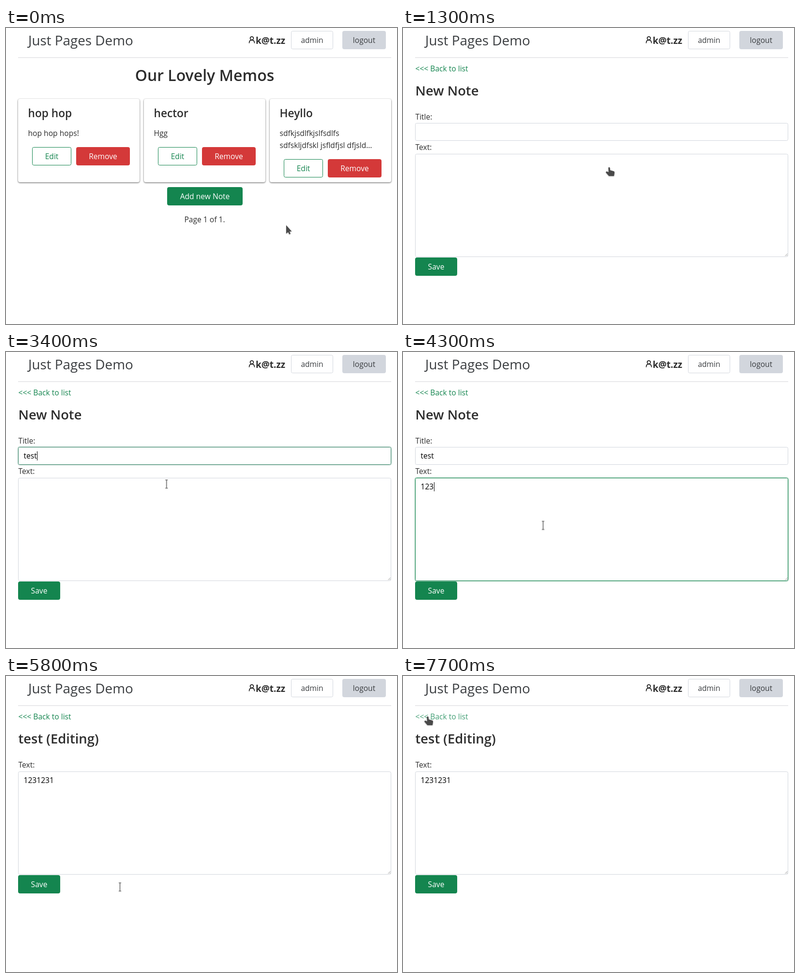
An HTML page for the animation above (8 s loop, 808 px wide and 614 px high).

```html
<!DOCTYPE html>
<html lang="en">
<head>
<meta charset="utf-8">
<title>Notes app</title>
<style>
  html, body { margin: 0; width: 100%; height: 100%; overflow: hidden; background: #fff; }
  svg { display: block; width: 808px; height: 614px; font: 15.6px "Open Sans", "Noto Sans", sans-serif; }
  .card { filter: drop-shadow(0 1px 1.5px rgba(0, 0, 0, .65)); }
  .cursor { filter: drop-shadow(0 1px 1px rgba(0, 0, 0, .3)); }
</style>
</head>
<body>
<svg id="stage" viewBox="0 0 808 614"></svg>
<script>
const LOOP = 8000, STEP = 100;
const GREEN = '#14854f', LIGHT_GREEN = '#439f75', RED = '#d43939';
const INK = '#2d2d2d', GREY = '#d2d6dd', HOVER = '#b9bdc4', DARK = '#706c76';
const stage = document.getElementById('stage');
const pen = document.createElement('canvas').getContext('2d');
pen.font = '15.6px "Open Sans", "Noto Sans", sans-serif';

// Pointer path: time, x, y, shape from that time on
const path = [
  [0, 579, 409, 'arrow'], [400, 484, 364, 'hand'], [700, 425, 346, 'hand'],
  [800, 425, 346, 'hand'], [1300, 426, 289, 'hand'], [1400, 415, 275, 'beam'],
  [1700, 390, 250, 'beam'], [2000, 363.5, 209.5, 'beam'], [3100, 363.5, 209.5, 'beam'],
  [3800, 289.5, 359.5, 'beam'], [4500, 289.5, 359.5, 'beam'], [4800, 100, 486, 'hand'],
  [4900, 80, 491, 'hand'], [5000, 80, 491, 'hand'], [5100, 160, 464, 'beam'],
  [5200, 235.5, 437.5, 'beam'], [6400, 235.5, 437.5, 'beam'], [6500, 339.5, 397.5, 'beam'],
  [7000, 110, 150, 'arrow'], [7200, 56, 92, 'hand'], [7300, 48, 84, 'hand'],
  [7600, 48, 84, 'hand'], [7700, 51, 84, 'hand'], [LOOP, 51, 84, 'hand']
];
const shapes = {
  arrow: '<path fill="#4a4a4a" d="M0 0V17.5L4 14.2L6.4 19L9 17.8L6.8 13H11.5Z"/>',
  hand: '<path fill="#4a4a4a" d="M-1.6 .8Q0 -1.2 1.5 .8L2.2 6L10 8.2Q11.4 9 11 12L10 18H-.5L-6.6 11Q-7 8.4 -4.8 8.6L-1.2 10Z"/>',
  beam: '<path fill="none" stroke="#444" d="M0 -8V8M-2.5 -8.5H2.5M-2.5 8.5H2.5"/>'
};

const within = (t, from, to) => t >= from && t < to;

function text(x, y, str, { size = 15.6, weight = 400, fill = INK, anchor = 'start' } = {}) {
  return `<text x="${x}" y="${y}" font-size="${size}" font-weight="${weight}" fill="${fill}" text-anchor="${anchor}">${str.replace(/</g, '&lt;')}</text>`;
}

function box(x, y, w, h, fill, stroke = fill, extra = '') {
  return `<rect x="${x + .5}" y="${y + .5}" width="${w - 1}" height="${h - 1}" rx="3" fill="${fill}" stroke="${stroke}" ${extra}/>`;
}

function button(x, y, w, label, fill, color = '#fff', stroke = fill) {
  return box(x, y, w, 38, fill, stroke) + text(x + w / 2, y + 25, label, { fill: color, anchor: 'middle' });
}

function header() {
  return text(46, 36, 'Just Pages Demo', { size: 27.8, fill: '#3a3d40' })
    + '<path fill="none" stroke="#000" stroke-width="1.5" d="M502.5 31.5Q502.5 25 508 25T513.5 31.5"/>'
    + '<circle cx="508" cy="21.3" r="3.4" fill="#fff" stroke="#000" stroke-width="1.5"/>'
    + text(516, 33, 'k@t.zz', { size: 19, weight: 700 })
    + button(589, 6, 87, 'admin', '#fff', '#3a3d40', GREY)
    + button(695, 6, 90, 'logout', GREY, '#3a3d40')
    + '<path stroke="#d6d6da" d="M25 61.5H796"/>';
}

function card(x, title, lines) {
  const y = 222 + 25 * lines.length;
  return box(x, 147, 251, 173, '#fff', '#fff', 'class="card"')
    + text(x + 20.5, 185, title, { size: 22.7, weight: 600 })
    + lines.map((line, i) => text(x + 20.5, 224 + 25 * i, line)).join('')
    + button(x + 29, y, 81, 'Edit', '#fff', GREEN, GREEN)
    + button(x + 120, y, 111, 'Remove', RED);
}

function listPage(t) {
  return text(410.5, 110, 'Our Lovely Memos', { size: 32, weight: 600, anchor: 'middle' })
    + card(25, 'hop hop', ['hop hop hops!'])
    + card(285, 'hector', ['Hgg'])
    + card(545, 'Heyllo', ['sdfkjsdlfkjslfsdlfs', 'sdfskljdfskl jsfldfjsl dfjsld…'])
    + button(333, 330, 156, 'Add new Note', t >= 400 ? LIGHT_GREEN : GREEN)
    + text(410.5, 403, 'Page 1 of 1.', { anchor: 'middle' });
}

function field(y, h, value, border, focused) {
  const glow = focused ? box(24, y - 1, 773, h + 2, 'none', border, 'opacity=".4"') : '';
  const grip = h > 40 ? `<path stroke="#999" d="M789.5 ${y + h - 2}l5 -5M792.5 ${y + h - 2}l2 -2"/>` : '';
  const x = value ? Math.round(37 + pen.measureText(value).width) + .5 : 36.5;
  const caret = focused ? `<path stroke="#000" d="M${x} ${y + 9}v19"/>` : '';
  return glow + box(25, y, 771, h, '#fff', border) + grip
    + text(36.5, y + 24, value, { fill: '#000' }) + caret;
}

function formTop(t, heading) {
  return text(25.5, 90, '<<< Back to list', { fill: t >= 7200 ? LIGHT_GREEN : GREEN })
    + text(25.5, 140, heading, { size: 27.4, weight: 600 });
}

function newPage(t) {
  const inTitle = within(t, 2200, 3500), inText = within(t, 3600, 5000);
  const title = 'test'.slice(0, t < 2900 ? 0 : t < 3000 ? 2 : 4);
  const note = '1231231'.slice(0, Math.max(0, (t - 4000) / STEP));
  const titleBorder = inTitle ? '#428a70' : within(t, 1900, 2200) ? HOVER : GREY;
  const hovered = within(t, 1400, 1900) || t >= 5100;
  return formTop(t, 'New Note')
    + text(25.5, 190, 'Title:') + field(197, 37, title, titleBorder, inTitle)
    + text(25.5, 253, 'Text:') + field(261, 214, note, inText ? GREEN : hovered ? HOVER : GREY, inText)
    + button(25, 476, 87, 'Save', within(t, 4800, 5400) ? LIGHT_GREEN : GREEN);
}

function editPage(t) {
  const border = within(t, 6100, 6600) ? DARK : within(t, 6600, 7000) ? HOVER : GREY;
  return formTop(t, 'test (Editing)')
    + text(25.5, 190, 'Text:') + field(198, 214, '1231231', border, false)
    + button(25, 413, 87, 'Save', GREEN);
}

function cursor(t) {
  const i = path.findIndex(key => key[0] > t);
  const [t0, x0, y0, shape] = path[i - 1], [t1, x1, y1] = path[i];
  const k = (t - t0) / (t1 - t0);
  return `<g class="cursor" transform="translate(${x0 + (x1 - x0) * k} ${y0 + (y1 - y0) * k})">${shapes[shape]}</g>`;
}

let shown = -1;
function draw(now) {
  const t = Math.floor(now % LOOP / STEP) * STEP;
  if (t !== shown) {
    shown = t;
    const page = t < 1100 ? listPage : t < 5800 ? newPage : editPage;
    stage.innerHTML = header() + page(t) + cursor(t);
  }
  requestAnimationFrame(() => draw(performance.now() - start));
}
const start = performance.now();
draw(0);
</script>
</body>
</html>
```
